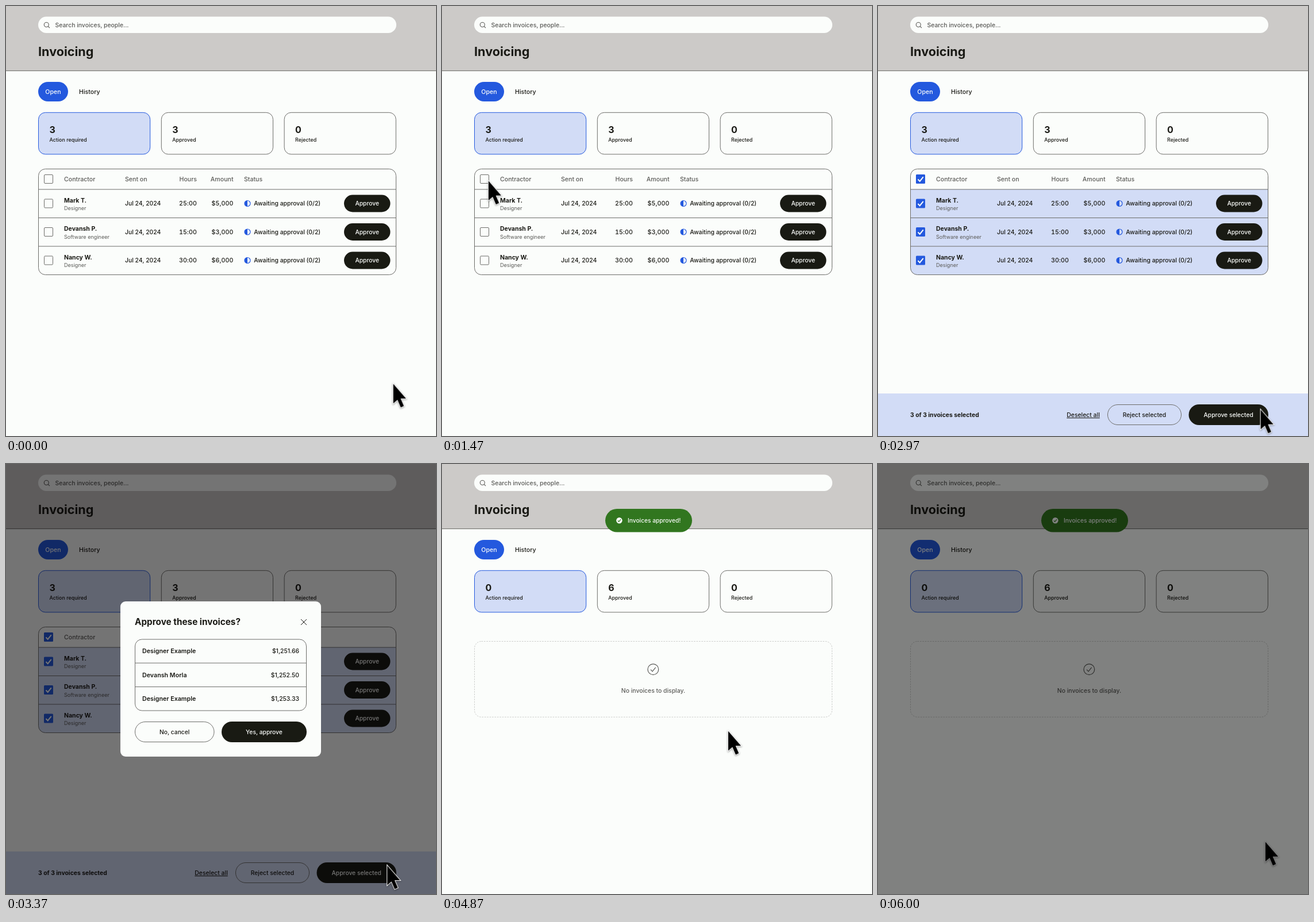
These frames come from a looping animation (748 by 748 pixels, 6030 ms). An HTML page with a canvas:

```html
<!DOCTYPE html>
<html lang="en">
<head>
<meta charset="utf-8">
<title>Invoicing</title>
<style>
html, body { margin: 0; width: 100%; height: 100%; overflow: hidden; background: #fbfdfb; }
svg, canvas { position: absolute; left: 0; top: 0; width: 748px; height: 748px; }
text { font-family: Inter, Roboto, sans-serif; white-space: pre; }
.num { font-variant-numeric: tabular-nums; }
</style>
</head>
<body>
<svg id="page" viewBox="0 0 748 748"></svg>
<canvas id="top" width="748" height="748"></canvas>
<script>
const INK = '#1a1a15', GRAY = '#5b5b58', EDGE = '#6d6d6a', PAPER = '#fbfdfb',
      BLUE = '#2459de', PALE = '#d2dcf6', GREEN = '#31761f', SHADE = '#020002';
const LOOP = 6030, SCENE = 1500, LEAD = 8;

// y is the vertical middle of the capitals
function text(s, x, y, { size = 10.4, weight = 500, fill = INK, anchor = 'start', extra = '' } = {}) {
  return `<text x="${x}" y="${y + size * 0.364}" font-size="${size}" font-weight="${weight}" fill="${fill}" text-anchor="${anchor}" ${extra}>${s}</text>`;
}
function box(x, y, w, h, r, fill = 'none', stroke = 'none', extra = '') {
  return `<rect x="${x}" y="${y}" width="${w}" height="${h}" rx="${r}" fill="${fill}" stroke="${stroke}" ${extra}/>`;
}
function line(d, stroke = EDGE, width = 1) {
  return `<path d="${d}" fill="none" stroke="${stroke}" stroke-width="${width}"/>`;
}
function disc(x, y, r, fill, stroke = 'none') {
  return `<circle cx="${x}" cy="${y}" r="${r}" fill="${fill}" stroke="${stroke}" stroke-width="1.2"/>`;
}
function pill(label, x, y, w, h, dark, size = 10.3) {
  const shape = dark ? box(x, y, w, h, h / 2, '#191a13')
                     : box(x + .5, y + .5, w - 1, h - 1, h / 2 - .5, 'none', EDGE);
  return shape + text(label, x + w / 2, y + h / 2, { size, fill: dark ? PAPER : INK, anchor: 'middle' });
}
const group = (id, body) => `<g id="${id}">${body}</g>`;

const people = [
  ['Mark T.', 'Designer', '25:00', '$5,000'],
  ['Devansh P.', 'Software engineer', '15:00', '$3,000'],
  ['Nancy W.', 'Designer', '30:00', '$6,000']
];
const rowY = i => 343.5 + i * 49.5;
const boxYs = [301, ...people.map((_, i) => rowY(i))];

function header() {
  return box(0, 0, 748, 112.5, 0, '#cccac8') + line('M0 112.7H748', '#60605e') +
    box(56, 18.5, 623, 28.5, 14.25, PAPER) +
    line('M74.3 32.5a4 4 0 1 1-8 0a4 4 0 1 1 8 0M73.2 35.4L76 38.2', GRAY, 1.1) +
    text('Search invoices, people...', 85.5, 33, { fill: GRAY }) +
    text('Invoicing', 56, 79.3, { size: 21.6, weight: 700 }) +
    box(56, 132, 52, 34, 17, BLUE) +
    text('Open', 82, 149.2, { size: 10.6, fill: PAPER, anchor: 'middle' }) +
    text('History', 127, 149.2, { size: 10.6 }) +
    ['Action required', 'Approved', 'Rejected'].map((label, i) => {
      const x = 56 + i * 213.8;
      return box(x + .5, 185.3, 194.2, 72.6, 12, i ? 'none' : PALE, i ? EDGE : BLUE) +
        text(label, x + 19.5, 232.5, { size: 8.9 });
    }).join('');
}
const counts = list => list.map((n, i) =>
  text(n, 75.5 + i * 213.8, 215, { size: 16, weight: 700 })).join('');

function table() {
  const labels = [['Contractor', 101], ['Sent on', 207], ['Hours', 332, 'end'], ['Amount', 395.5, 'end'], ['Status', 414]];
  return boxYs.map(y => box(66.5, y - 7.5, 15, 15, 1.5, PAPER, EDGE)).join('') +
    group('ticks',
      `<path d="M56.5 319H678.5V455.5a12 12 0 0 1-12 12H68.5a12 12 0 0 1-12-12Z" fill="${PALE}"/>` +
      boxYs.map(y => box(66, y - 8, 16, 16, 1.5, BLUE) +
        line(`M69.5 ${y + .5}l3.2 3.4l6-7.6`, PAPER, 2)).join('')) +
    box(56.5, 283.5, 622, 184, 12, 'none', EDGE) +
    line('M56.5 319H678.5M56.5 368.5H678.5M56.5 418H678.5') +
    labels.map(([s, x, anchor]) => text(s, x, 301.3, { size: 10.6, fill: GRAY, anchor })).join('') +
    people.map(([name, job, hours, sum], i) => {
      const y = rowY(i), num = { size: 10.6, anchor: 'end', extra: 'class="num" letter-spacing=".15"' };
      return text(name, 101, y - 5.8, { size: 10.5, weight: 700 }) +
        text(job, 101, y + 8.3, { size: 9.1, weight: 400, fill: GRAY }) +
        text('Jul 24, 2024', 207, y) + text(hours, 332, y, num) + text(sum, 395.5, y, num) +
        disc(420, y, 5, 'none', BLUE) + `<path d="M420 ${y - 5}a5 5 0 0 0 0 10Z" fill="${BLUE}"/>` +
        text('Awaiting approval (0/2)', 431.3, y) + pill('Approve', 588, y - 15, 80.5, 30, true);
    }).join('');
}

function bar() {
  return box(0, 674, 748, 74, 0, PALE) +
    text('3 of 3 invoices selected', 56, 711.3, { weight: 700 }) +
    text('Deselect all', 328.3, 711.3, { extra: 'text-decoration="underline"' }) +
    pill('Reject selected', 399, 693, 129, 36, false) +
    pill('Approve selected', 540.5, 693, 138.5, 36, true);
}

function dialog() {
  const items = [['Designer Example', '$1,251.66'], ['Devansh Morla', '$1,252.50'], ['Designer Example', '$1,253.33']];
  return box(0, 0, 748, 748, 0, SHADE, 'none', 'opacity=".54"') +
    box(199, 239, 349, 270, 9, PAPER) +
    text('Approve these invoices?', 224, 274.8, { size: 15.3, weight: 700 }) +
    line('M513 270l10 10M523 270l-10 10', INK) +
    box(224.5, 305, 298, 124, 12, 'none', EDGE) + line('M224.5 346.2H522.5M224.5 387.6H522.5') +
    items.map(([name, sum], i) => {
      const y = 325.6 + i * 41.3;
      return text(name, 237, y, { size: 10.7, weight: 600 }) + text(sum, 510, y, { anchor: 'end' });
    }).join('') +
    pill('No, cancel', 224, 448, 138.5, 36, false) +
    pill('Yes, approve', 375, 448, 148, 36, true);
}

function empty() {
  return box(56.5, 308.5, 622, 131.7, 12, 'none', '#cbccca', 'stroke-dasharray="2.6 1.8"') +
    disc(367.3, 357.2, 9.4, 'none', GRAY) + line('M363 357.6l3 3.2l5.6-7', GRAY, 1.2) +
    text('No invoices to display.', 367.5, 394.5, { fill: GRAY, anchor: 'middle' }) +
    box(284, 78, 151, 40.5, 20.25, GREEN) +
    disc(308.4, 98.3, 5.2, PAPER) + line('M305.9 98.5l1.8 1.9l3.2-4', GREEN, 1.2) +
    text('Invoices approved!', 323, 98.3, { size: 10.2, fill: PAPER });
}

const $ = id => document.getElementById(id);
$('page').innerHTML = header() +
  group('before', counts([3, 3, 0]) + table()) + group('bar', bar()) +
  group('dialog', dialog()) + group('after', counts([0, 6, 0]) + empty());

// Arrow sprite, tip at 4,4
const sprite = document.createElement('canvas');
sprite.width = 40;
sprite.height = 60;
{
  const c = sprite.getContext('2d');
  const arrow = new Path2D('M5 5.5V39.5L12.3 33.2L18 46.4L23.4 44L17.8 31H27.2Z');
  c.shadowColor = 'rgba(0,0,0,.45)';
  c.shadowBlur = 3;
  c.shadowOffsetY = 1;
  c.strokeStyle = '#fff';
  c.lineWidth = 2;
  c.stroke(arrow);
  c.shadowColor = 'transparent';
  c.fill(arrow);
}

// One stop per scene; each scene glides from its stop to the next
const stops = [[673, 656], [79.5, 302.5], [665, 701], [494, 460], [673, 656]];

// Exponential ease in and out
const ease = u => u < .5 ? 2 ** (20 * u - 11) : 1 - 2 ** (9 - 20 * u);

function cursorAt(t) {
  const place = Math.min(4, Math.max(0, (t + LEAD) / SCENE));
  const i = Math.min(3, Math.floor(place)), p = ease(place - i);
  return stops[i].map((v, k) => v + (stops[i + 1][k] - v) * p);
}

const ctx = $('top').getContext('2d');
function drawCursor(t) {
  const shutter = 14, a = cursorAt(t - shutter / 2), b = cursorAt(t + shutter / 2);
  const n = Math.hypot(b[0] - a[0], b[1] - a[1]) < 1 ? 1 : 16;
  ctx.globalCompositeOperation = 'lighter';
  ctx.globalAlpha = 1 / n;
  for (let i = 0; i < n; i++) {
    const [x, y] = cursorAt(t + ((i + .5) / n - .5) * shutter);
    ctx.drawImage(sprite, x - 4, y - 4);
  }
  ctx.globalCompositeOperation = 'source-over';
}

const show = (id, on) => $(id).style.display = on ? '' : 'none';
function render(t) {
  const scene = Math.floor((t + LEAD) / SCENE), done = scene >= 3;
  show('before', !done);
  show('after', done);
  show('ticks', scene >= 1);
  show('bar', scene === 1 || scene === 2);
  show('dialog', scene === 2);
  ctx.clearRect(0, 0, 748, 748);
  drawCursor(t);
  ctx.globalAlpha = Math.min(.49, Math.max(0, (t - 5700) / 300 * .49));
  ctx.fillStyle = SHADE;
  ctx.fillRect(0, 0, 748, 748);
}

const began = performance.now();
function tick() {
  render((performance.now() - began) % LOOP);
  requestAnimationFrame(tick);
}
tick();
</script>
</body>
</html>
```
